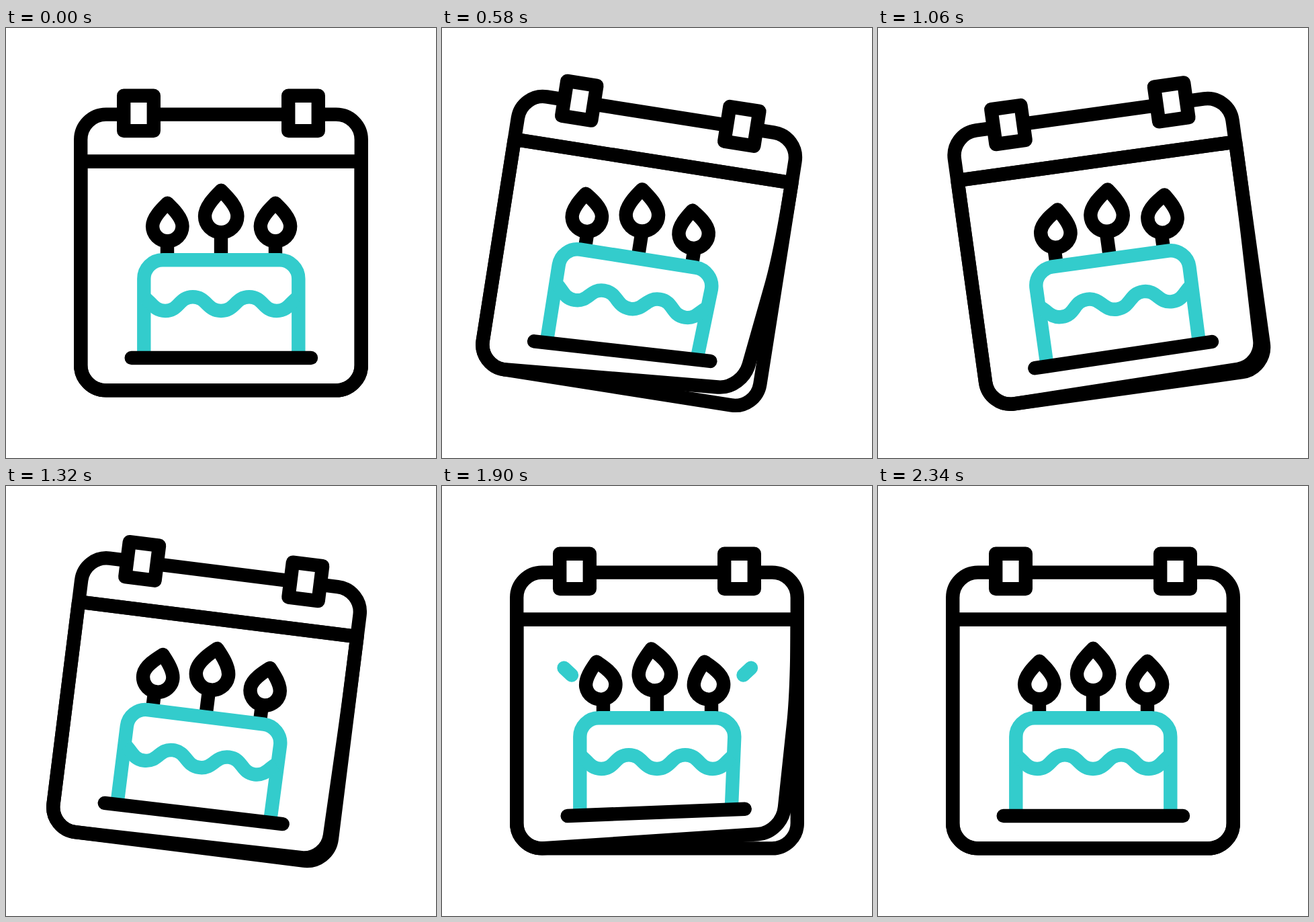
An HTML page that plays this animation: 640 by 640 pixels, repeating every 2400 ms.

```html
<!DOCTYPE html>
<html lang="en">
<head>
<meta charset="utf-8">
<title>Birthday calendar</title>
<style>
  html, body { margin: 0; width: 100%; height: 100%; overflow: hidden; background: #fff; }
  svg { display: block; width: 100vw; height: 100vh; }
  .ink { fill: none; stroke: #000; stroke-width: 20.4; stroke-linejoin: round; }
  .icing { fill: none; stroke: #33cccc; stroke-width: 20.4; stroke-linejoin: round; }
  .round { stroke-linecap: round; }
  .clip { fill: #fff; }
</style>
</head>
<body>
<svg viewBox="0 0 640 640">
  <g id="calendar">
    <rect class="ink" x="111.2" y="128.6" width="417.6" height="410.8" rx="37.6"/>
    <path class="ink" d="M111 198.6H529"/>
    <path class="ink" id="page"/>
    <rect class="ink clip" x="175.2" y="100.7" width="44.6" height="52.4"/>
    <rect class="ink clip" x="420.2" y="100.7" width="44.6" height="52.4"/>
    <path class="icing round" id="sparkLeft"/>
    <path class="icing round" id="sparkRight"/>
    <path class="ink" d="M240 318V342M320 306V342M401 318V342"/>
    <path class="ink" id="flameLeft"/>
    <path class="ink" id="flameMid"/>
    <path class="ink" id="flameRight"/>
    <path class="icing" id="cake"/>
    <path class="icing" d="M207 402C217 409 221 421 237 421C258 421 257 400.3 278 400.3S299 421 320 421S341 400.3 362 400.3S382 421 403 421C419 421 423 409 433 402"/>
    <path class="ink round" id="plate"/>
  </g>
</svg>
<script>
const STEP = 20, STEPS = 120;
const el = id => document.getElementById(id);

// Keys are [step, value] pairs, eased in and out between neighbours.
const SWING = [[10, 0], [30, 9], [50, -9], [70, 9], [80, -4], [90, 4], [100, -4], [117, 0]];
const CURL = [[10, 0], [35, 1], [60, 0], [85, 1], [117, 0]];
const SWAY = [[10, 0], [35, -11.5], [55, 11], [85, -11.3], [117, 0]];
const SPARK_HEAD = [[90, 0], [100, 1]];
const SPARK_TAIL = [[98, 0], [108, 1]];

function valueAt(keys, n) {
  if (n <= keys[0][0]) return keys[0][1];
  for (let i = 1; i < keys.length; i++) {
    const [a, from] = keys[i - 1], [b, to] = keys[i];
    if (n < b) {
      const u = (n - a) / (b - a);
      return from + (to - from) * u * u * (3 - 2 * u);
    }
  }
  return keys[keys.length - 1][1];
}

const flames = [
  { id: "flameLeft", x: 240.3, tip: 260.8, wide: 295, r: 22.2, sway: 1.2 },
  { id: "flameMid", x: 320.2, tip: 241.8, wide: 280, r: 24.2, sway: 1 },
  { id: "flameRight", x: 401, tip: 260.8, wide: 295, r: 22.2, sway: 1.2 }
];

for (const { id, x, tip, wide, r } of flames) {
  const h = wide - tip;
  const near = r * 0.38, nearY = tip + h * 0.24, farY = wide - h * 0.37;
  el(id).setAttribute("d",
    `M${x} ${tip}C${x - near} ${nearY} ${x - r} ${farY} ${x - r} ${wide}` +
    `A${r} ${r} 0 0 0 ${x + r} ${wide}C${x + r} ${farY} ${x + near} ${nearY} ${x} ${tip}Z`);
}

function drawPage(c) {
  const at = (x, y, dx, dy) => `${x + dx * c} ${y + dy * c}`;
  el("page").setAttribute("d",
    "M111.2 198.6V501.8A37.6 37.6 0 0 0 148.8 539.4" +
    `L${at(491.2, 539.4, -27.7, -27.5)}` +
    `C${at(512, 539.4, -27.7, -29.3)} ${at(528.8, 522.6, -27.2, -31)} ${at(528.8, 501.8, -24.5, -31)}` +
    `L${at(528.8, 350, -6.8, 0)}Q528.8 298 528.8 198.6Z`);
  el("cake").setAttribute("d",
    "M205.3 484V373.3A28 28 0 0 1 233.3 345.3H407.3A28 28 0 0 1 435.3 373.3" +
    `L${at(435.3, 484, -5.5, -13)}`);
  el("plate").setAttribute("d", `M186.7 491L${at(454, 491, -4.2, -13.4)}`);
}

function drawSpark(id, x, dir, tail, head) {
  const point = k => `${x + dir * 23 * k} ${281.5 - 21.5 * k}`;
  const spark = el(id);
  spark.style.display = head > tail ? "" : "none";
  spark.setAttribute("d", `M${point(tail)}L${point(head)}`);
}

function draw(n) {
  el("calendar").setAttribute("transform", `rotate(${valueAt(SWING, n)} 320 161)`);
  drawPage(valueAt(CURL, n));

  const sway = valueAt(SWAY, n);
  for (const f of flames) {
    const bottom = f.wide + f.r;
    const angle = sway * f.sway / (bottom - f.tip) * 180 / Math.PI;
    el(f.id).setAttribute("transform", `rotate(${angle} ${f.x} ${bottom})`);
  }

  const head = valueAt(SPARK_HEAD, n), tail = valueAt(SPARK_TAIL, n);
  drawSpark("sparkLeft", 193, -1, tail, head);
  drawSpark("sparkRight", 448.5, 1, tail, head);
}

const start = performance.now();
function tick() {
  const elapsed = Math.max(0, performance.now() - start);
  draw(Math.floor(elapsed / STEP) % STEPS);
  requestAnimationFrame(tick);
}
tick();
</script>
</body>
</html>
```
